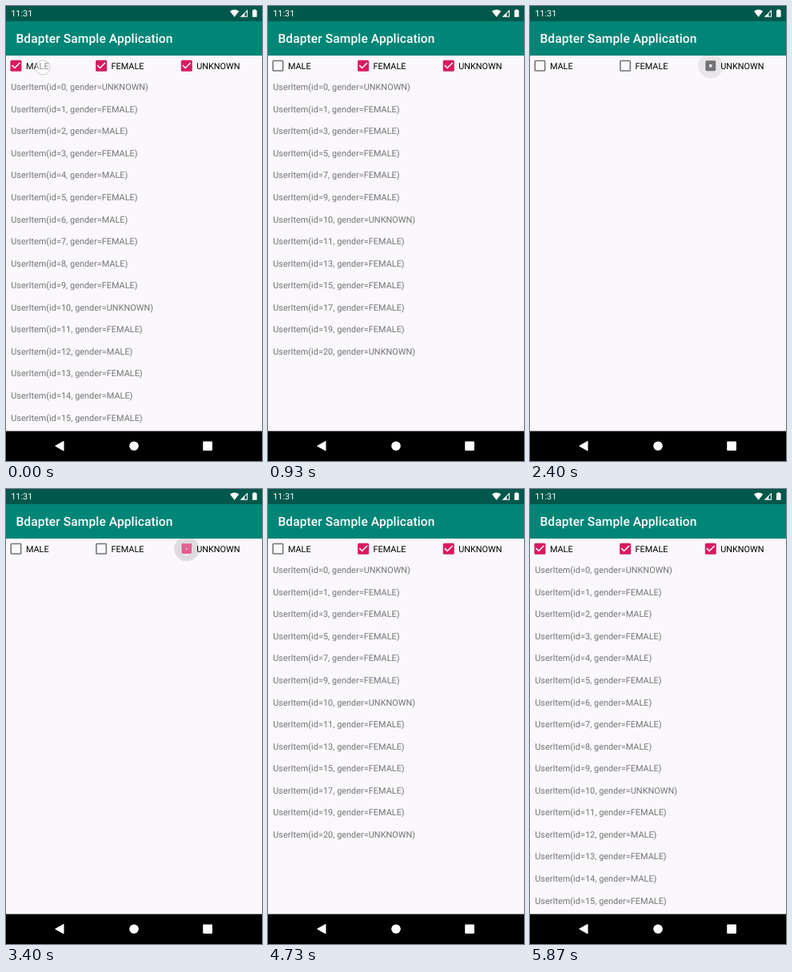
An HTML page for the animation above (5.94 s loop, 320x569 px).

```html
<!DOCTYPE html>
<html lang="en">
<head>
<meta charset="utf-8">
<title>Bdapter Sample Application</title>
<style>
  html, body { margin: 0; width: 100%; height: 100%; overflow: hidden; background: #faf8fb; }
  svg { display: block; width: 100%; height: 100%; }
  text { font: 400 10.89px Roboto, sans-serif; text-rendering: geometricPrecision; white-space: pre; }
  .item { fill: #747375; letter-spacing: .03px; }
  .label { fill: #000; }
  .clock { fill: #fff; }
  .title { font-size: 15.55px; font-weight: 500; letter-spacing: .1px; fill: #fff; }
</style>
</head>
<body>
<svg viewBox="0 0 320 569" preserveAspectRatio="none">
  <rect width="320" height="569" fill="#faf8fb"/>
  <g id="list"></g>
  <g id="boxes"></g>
  <circle id="touch" r="9" fill="#fff" fill-opacity=".55" stroke="#bfbdc0" stroke-width=".8"/>

  <rect y="19" width="320" height="43" fill="#008577"/>
  <rect width="320" height="19" fill="#00574b"/>
  <text class="clock" x="6.2" y="13.4">11:31</text>
  <g fill="#fff" fill-rule="evenodd">
    <path d="M285.6 13.8 L279.9 6.6 Q285.6 2.4 291.3 6.6 Z"/>
    <path d="M302 4.4 V13.8 H292.6 Z M301 7 L298.4 9.6 V12.8 H301 Z"/>
    <path d="M308 5.2 H309.5 V4.2 H312 V5.2 H313.6 V13.8 H308 Z"/>
  </g>
  <text class="title" x="12.4" y="46.3">Bdapter Sample Application</text>

  <rect y="531.6" width="320" height="37.4" fill="#000"/>
  <g fill="#fff">
    <path d="M61.7 550.2 L72 544.4 V556 Z" stroke="#fff" stroke-linejoin="round"/>
    <circle cx="160" cy="550.2" r="5.8"/>
    <rect x="246.2" y="544.4" width="11.7" height="11.7" rx="1"/>
  </g>
</svg>
<script>
const LOOP = 5940, PITCH = 27.556, DP = 0.7776, BOX_Y = 74.7;
const FADE = 120, MOVE = 250;
const GENDERS = ['MALE', 'FEMALE', 'UNKNOWN'];

// Each tap flips one filter; the list reacts a little later.
const taps = [
  { who: 0, on: false, at: 145, list: 270, x: 46, y: 77 },
  { who: 1, on: false, at: 1115, list: 1238, x: 146, y: 75 },
  { who: 2, on: false, at: 2170, list: 2290, x: 225.5, y: 76 },
  { who: 2, on: true, at: 3265, list: 3390, x: 225.5, y: 76 },
  { who: 1, on: true, at: 4255, list: 4367, x: 146, y: 75 },
  { who: 0, on: true, at: 5370, list: 5480, x: 44.5, y: 75 }
];

const clamp = (v, a = 0, b = 1) => Math.min(b, Math.max(a, v));
const lerp = (a, b, p) => a + (b - a) * p;
const ease = p => (1 - Math.cos(Math.PI * clamp(p))) / 2;
const decel = p => 1 - (1 - clamp(p)) ** 2;

function add(parent, tag, attrs, text) {
  const el = document.createElementNS('http://www.w3.org/2000/svg', tag);
  set(el, attrs);
  if (text) el.textContent = text;
  return parent.appendChild(el);
}
function set(el, attrs) {
  for (const k in attrs) el.setAttribute(k, attrs[k]);
}
const byId = id => document.getElementById(id);

const items = Array.from({ length: 21 }, (_, id) => {
  const gender = id % 10 === 0 ? 2 : id % 2;
  const el = add(byId('list'), 'text', { class: 'item', x: 6.2 },
    `UserItem(id=${id}, gender=${GENDERS[gender]})`);
  return { gender, el };
});

const boxes = GENDERS.map((name, i) => {
  const g = byId('boxes'), x = i * 320 / 3, cx = x + 16 * DP;
  const ripple = add(g, 'circle', { cy: BOX_Y, fill: '#000', 'fill-opacity': 0.11 });
  add(g, 'text', { class: 'label', x: x + 32 * DP, y: 78.6 }, name);
  const mark = add(g, 'g', { transform: `translate(${cx} ${BOX_Y}) scale(${DP})` });
  return {
    cx, ripple,
    frame: add(mark, 'path', { 'fill-rule': 'evenodd' }),
    check: add(mark, 'path', {
      d: 'M-2 5 L-7 0 L-5.59 -1.41 L-2 2.17 L5.59 -5.42 L7 -4 Z', fill: '#fff'
    })
  };
});

function framePath(hole) {
  const h = hole / 2;
  return 'M-7 -9 H7 Q9 -9 9 -7 V7 Q9 9 7 9 H-7 Q-9 9 -9 7 V-7 Q-9 -9 -7 -9 Z' +
    (h > 0 ? `M${-h} ${-h} H${h} V${h} H${-h} Z` : '');
}

function drawBoxes(t) {
  boxes.forEach((box, i) => {
    const tap = taps.filter(e => e.who === i && e.at <= t).pop();
    const on = tap ? tap.on : true, age = tap ? t - tap.at : LOOP;
    const hole = on ? 14 * (1 - clamp(age / 160)) : 14 * decel((age - 166) / 334);
    const check = on ? decel((age - 166) / 334) : 1 - clamp(age / 166);
    const dip = 1 - 0.1 * Math.sin(Math.PI * clamp(age / 330));
    set(box.frame, {
      d: framePath(hole), fill: on ? '#d81b60' : '#747375', transform: `scale(${dip})`
    });
    set(box.check, { transform: `scale(${check})` });

    const press = taps.find(e => e.who === i && t >= e.at - 100 && t < e.at + 370);
    const grow = press ? decel((t - press.at + 100) / 225) : 0;
    set(box.ripple, {
      cx: press ? box.cx + clamp(press.x - box.cx, -9, 9) * (1 - grow) : box.cx,
      r: 20 * DP * grow,
      opacity: press ? 1 - clamp((t - press.at - 150) / 220) : 0
    });
  });
}

function drawTouch(t) {
  const tap = taps.find(e => t >= e.at - 150 && t < e.at + 200);
  set(byId('touch'), tap
    ? { cx: tap.x, cy: tap.y, opacity: 1 - clamp((t - tap.at - 80) / 120) }
    : { opacity: 0 });
}

// Removed rows fade out, kept rows slide, then new rows fade in.
function drawList(t) {
  let before = [true, true, true], after = before, u = 0;
  for (const e of taps) {
    if (e.list > t) break;
    before = after;
    after = before.map((v, i) => i === e.who ? e.on : v);
    u = t - e.list;
  }
  const has = test => items.some(it => test(before[it.gender], after[it.gender]));
  const fadeOut = has((b, a) => b && !a) ? FADE : 0;
  const slide = has((b, a) => b && a) ? MOVE : 0;
  let from = 0, to = 0;
  for (const { gender, el } of items) {
    const was = before[gender], is = after[gender];
    let row = 0, alpha = 0;
    if (was && is) {
      row = lerp(from, to, ease((u - fadeOut) / MOVE));
      alpha = 1;
    } else if (was) {
      row = from;
      alpha = 1 - ease(u / FADE);
    } else if (is) {
      row = to;
      alpha = ease((u - fadeOut - slide) / FADE);
    }
    set(el, { y: 105.2 + row * PITCH, opacity: alpha });
    from += was;
    to += is;
  }
}

// Fifteen pictures per second: 0, 70 and 130 ms in every 200 ms.
function hold(t) {
  const r = t % 200;
  return t - r + (r >= 130 ? 130 : r >= 70 ? 70 : 0);
}

const start = performance.now();
function draw(now) {
  const t = hold(Math.max(0, now - start) % LOOP);
  drawList(t);
  drawBoxes(t);
  drawTouch(t);
  requestAnimationFrame(draw);
}
draw(start);
</script>
</body>
</html>
```
